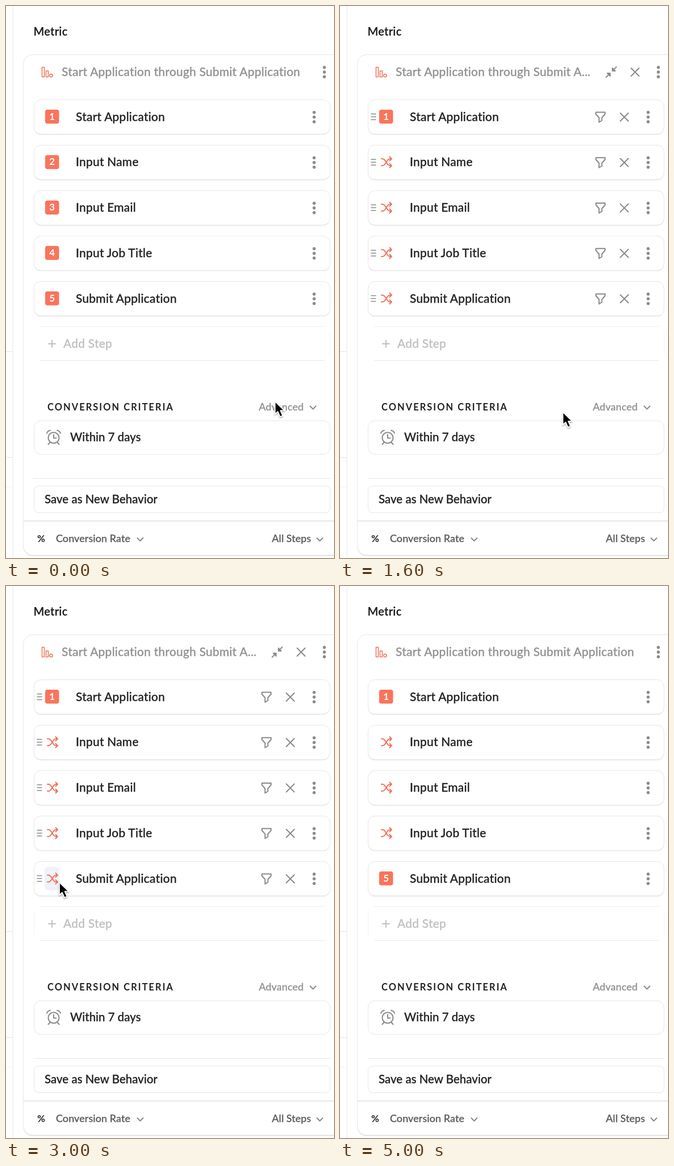
An HTML page for the animation above (5.4 s loop, 578x969 px).

```html
<!DOCTYPE html>
<html lang="en">
<head>
<meta charset="utf-8">
<title>Conversion steps</title>
<style>
  html, body { margin: 0; width: 100%; height: 100%; overflow: hidden; background: #fff; }
  svg { display: block; width: 100%; height: 100%; }
  text { font: 500 21px Lato, sans-serif; letter-spacing: .2px; fill: #222; stroke: #222; stroke-width: .3px; white-space: pre; }
  .small { font-size: 18px; letter-spacing: .05px; }
  .mid { font-size: 20.5px; letter-spacing: 0; }
  .bold { font-weight: 700; stroke-width: 0; }
  .grey { fill: #929292; stroke: #929292; }
  .dark { fill: #5c5c5c; stroke: #5c5c5c; }
  .pale { fill: #c0c0c0; stroke: #c0c0c0; }
  .hot text { fill: #5143c8; stroke: #5143c8; }
  .hot .line { stroke: #5143c8; }
  .line { fill: none; stroke: #8a8a8a; stroke-width: 2; stroke-linecap: round; stroke-linejoin: round; }
  .ink { stroke: #222; }
  .coral { stroke: #ef745b; }
  .box { fill: #fff; stroke: #e7e7e7; }
</style>
</head>
<body>
<svg id="stage" viewBox="0 0 578 969" preserveAspectRatio="none"></svg>
<script>
const stage = document.getElementById('stage');
const DURATION = 5400, STEP = 100;
const steps = ['Start Application', 'Input Name', 'Input Email', 'Input Job Title', 'Submit Application'];
const rowY = i => 195 + i * 79.75;

const text = (x, y, s, cls = '', extra = '') => `<text x="${x}" y="${y}" class="${cls}" ${extra}>${s}</text>`;
const line = (d, cls = '', x = 0, y = 0, extra = '') =>
  `<path d="${d}" class="line ${cls}" transform="translate(${x} ${y})" ${extra}/>`;
const rect = (x, y, w, h, r, extra = 'class="box"') =>
  `<rect x="${x}" y="${y}" width="${w}" height="${h}" rx="${r}" ${extra}/>`;
const group = (id, body, extra = '') => `<g id="${id}" ${extra}>${body}</g>`;
const rule = (x1, y, x2, color, w = 1) => `<path d="M${x1} ${y}H${x2}" stroke="${color}" stroke-width="${w}"/>`;

const dots = (x, y) => [-8.3, 0, 8.3].map(d => `<circle cx="${x}" cy="${y + d}" r="2.7" fill="#8a8a8a"/>`).join('');
const chevron = (x, y, cls = '') => line('M-5 -2.5L0 2.5L5 -2.5', cls, x, y);
const cross = (x, y) => line('M-7 -7L7 7M7 -7L-7 7', '', x, y);
const funnel = (x, y) => line('M-8 -8.5H8V-5L2.5 1V6L-2.5 9V1L-8 -5Z', '', x, y);
const shuffleArrows = 'M-9 -6H-7C-1 -6 0 6 6 6H9M-9 6H-7C-1 6 0 -6 6 -6H9M5.5 -9.5L9 -6L5.5 -2.5M5.5 2.5L9 6L5.5 9.5';

function row(name, i) {
  const y = rowY(i);
  return rect(49.5, y - 30, 521.5, 61, 12, 'fill="#dedede"') +
    rect(49.5, y - 30.5, 521.5, 60.5, 12) +
    (i === 4 ? group('iconHot', rect(68, y - 21, 26, 41, 6, 'fill="#f1f1fa"')) : '') +
    group('badge' + i, rect(69, y - 13, 24.5, 24.5, 4, 'fill="#f9745b"') +
      text(81.2, y + 4.5, i + 1, 'bold', 'text-anchor="middle" style="fill:#fff;font-size:17px"')) +
    group('mix' + i, line(shuffleArrows, 'coral', 82, y - .5)) +
    text(123, y + 6.5, name) + dots(543, y);
}

const rowTools = (_, i) => {
  const y = rowY(i);
  return line('M-4 -5H4M-4 0H4M-4 5H4', '', 59, y - .5, 'style="stroke-width:1.5"') + funnel(459, y) + cross(501, y);
};

const panel =
  `<path d="M12 0V969" stroke="#e6e6e6"/>` +
  rule(0, 606.5, 12, '#e6e6e6') + rule(0, 792.5, 12, '#e6e6e6') + rule(0, 844.5, 12, '#f2f2f2') +
  text(48.5, 52, 'Metric', 'bold', 'style="font-size:20px"') +
  rect(30.5, 87, 600, 878.5, 16, 'fill="#dedede"') + rect(30.5, 85.5, 600, 878.5, 16) +
  line('M63.5 107.5H67.5V124.500H63.5ZM70.5 114H74.5V124.500H70.500Z', 'coral', 0, 0, 'style="stroke-width:1.5"') +
  `<circle cx="79.5" cy="122" r="2.6" class="line coral" style="stroke-width:1.5"/>` +
  dots(561, 116) + steps.map(row).join('') +
  group('idle', text(98, 122.5, 'Start Application through Submit Application', 'grey')) +
  group('hover', text(98, 122.5, 'Start Application through Submit A...', 'grey') +
    line('M9 -9L2 -2M2 -7V-2H7ZM-9 9L-2 2M-2 7V2H-7Z', '', 478, 116, 'style="fill:#8a8a8a;stroke-width:1.8"') +
    cross(520, 116) + steps.map(rowTools).join(''));

const lower =
  rule(60, 562.5, 562, '#efefef') + rule(60, 622.5, 562, '#e9e9e9') +
  `<path d="M571 574V612" stroke="#f1f1f1"/>` + group('addEdge', `<path d="M50 574V612" stroke="#f1f1f1"/>`) +
  line('M-6 0H6M0 -6V6', '', 81, 593, 'style="stroke:#c0c0c0"') + text(101, 599.5, 'Add Step', 'pale') +
  text(73, 710, 'CONVERSION CRITERIA', 'bold', 'style="font-size:16.5px;letter-spacing:2px"') +
  group('advanced', rect(434, 685, 125, 36.500, 3, 'id="advancedBack" fill="#e9e7fa"') +
    text(445.5, 710, 'Advanced', 'small grey') + chevron(541, 705)) +
  group('within', rect(49.5, 728, 521.5, 59, 12, 'id="withinBox" class="box"') +
    text(113, 764, 'Within 7 days', 'mid') +
    group('sorter', line('M-4 -3L0 -7L4 -3M-4 3L0 7L4 3', '', 536, 757.5))) +
  `<circle cx="84" cy="758" r="9.5" class="line"/>` +
  line('M84 752.5V758.5H88.5M77.500 766L74.500 769.500M90.500 766L93.500 769.500M72 750Q73 746 78 745M96 750Q95 746 90 745') +
  rule(49, 829.5, 571, '#e6e6e6') + rect(49.5, 842.5, 521.5, 47, 8) + text(68, 873, 'Save as New Behavior', 'mid') +
  rule(31, 904, 578, '#e8e8e8', 2) +
  text(55, 941, '%', 'small bold', 'style="font-size:17px"') +
  text(88, 941, 'Conversion Rate', 'small dark') + chevron(236.5, 936.5, 'dark" style="fill:none') +
  text(468.5, 941, 'All Steps', 'small dark') + chevron(553, 936.5, 'dark" style="fill:none');

const menu = group('menu',
  rect(60, 685, 367.5, 207, 15, 'fill="#fff" stroke="#cfcfcf" filter="url(#soft)"') +
  group('order', rect(72, 697, 343.5, 61.5, 7, 'id="orderBack" fill="#f2f1fb"') +
    line('M84.500 716V740.500H109', 'ink') + line(shuffleArrows, 'ink', 99, 728) + text(125, 735, 'Any Order')) +
  rect(337, 706.5, 69, 35, 17.5, 'id="track"') + `<circle id="knob" cy="724" r="15.5" fill="#fff"/>` +
  line('M-12 0Q0 -17 12 0Q0 17 -12 0ZM-10 -10L10 10', 'ink', 96.5, 790) +
  `<circle cx="96.500" cy="790" r="4" class="line ink"/>` +
  text(125, 796.5, 'Exclude users who did...') +
  line('M-10.5 -3H10.5V12H-10.5ZM-6 -3V-7A6 6 0 0 1 6 -7V-3M0 3V6', 'ink', 96.5, 851) +
  text(125, 857.5, 'Holding property constant...'));

const tipLine = (s, x, y) => text(x, y, s, '', 'text-anchor="end" style="font-size:17px;fill:#f4f4f4;stroke:none"');
const tooltip = group('tooltip',
  '<path d="M0 728H31Q36.500 728 36.500 734V745L48 757.500L36.500 770V831Q36.500 836.500 31 836.500H0Z" fill="#c9c9c9"/>' +
  tipLine('er', 11, 757) + tipLine('el', 16, 778) + tipLine('er.', 17, 799));

const cursor = group('cursor',
  '<path d="M0 0V22.500L5 18L9 27L13.500 25L9.600 16.200H16.500Z" stroke="#fff" stroke-width="1.8" stroke-linejoin="round" filter="url(#drop)"/>');

stage.innerHTML = `<defs>
  <filter id="soft" x="-10%" y="-10%" width="120%" height="125%"><feDropShadow dx="0" dy="2" stdDeviation="4" flood-opacity=".2"/></filter>
  <filter id="drop" x="-50%" y="-50%" width="200%" height="200%"><feDropShadow dx="0" dy="1.500" stdDeviation="1.200" flood-opacity=".4"/></filter>
  </defs>` + panel + lower + menu + tooltip + cursor;

// Pointer path: time, x, y
const path = [
  [0, 474, 694], [100, 476, 696], [300, 478, 698], [800, 478, 698], [1200, 395, 709], [1500, 395, 709],
  [1800, 388, 720], [2100, 370, 712], [2400, 300, 665], [2700, 165, 580], [3000, 94, 520], [3200, 87, 517],
  [3400, 87, 518], [3700, 103, 573], [3800, 103, 573], [4100, 190, 728], [4300, 257, 825], [4400, 283, 874],
  [4600, 318, 945], [4700, 335, 985], [5400, 335, 985]
];

function pointer(t) {
  const i = path.findIndex(p => p[0] > t);
  const [t0, x0, y0] = path[i - 1], [t1, x1, y1] = path[i], k = (t - t0) / (t1 - t0);
  return [x0 + (x1 - x0) * k, y0 + (y1 - y0) * k];
}

const el = id => document.getElementById(id);
const show = (id, on) => el(id).style.display = on ? '' : 'none';
const heat = (id, on) => el(id).classList.toggle('hot', on);

function render(t) {
  const during = (a, b) => t >= a && t < b;
  const hovering = during(100, 800) || during(1600, 4700);
  const mixed = t >= 1400, pinned = t >= 3400;
  const advancedHot = during(100, 1600), orderHot = during(1100, 1600), withinHot = during(4100, 4400);

  show('hover', hovering);
  show('idle', !hovering);
  steps.forEach((_, i) => {
    const numbered = i === 0 || !mixed || (i === 4 && pinned);
    show('badge' + i, numbered);
    show('mix' + i, !numbered);
  });
  show('iconHot', during(2900, 3400));
  show('addEdge', t >= 2700);

  heat('advanced', advancedHot);
  show('advancedBack', advancedHot);
  show('menu', during(800, 1600));
  heat('order', orderHot);
  show('orderBack', orderHot);
  el('track').setAttribute('fill', mixed ? '#5143c8' : '#e5e5e5');
  el('knob').setAttribute('cx', mixed ? 389 : 354);

  heat('within', withinHot);
  el('withinBox').style.fill = withinHot ? '#f4f4fb' : '';
  show('sorter', withinHot);
  show('tooltip', during(4200, 4400));

  el('cursor').setAttribute('transform', `translate(${pointer(t)})`);
}

const start = performance.now();
function frame() {
  const t = (performance.now() - start) % DURATION;
  render(Math.floor(t / STEP) * STEP);
  requestAnimationFrame(frame);
}
frame();
</script>
</body>
</html>
```
